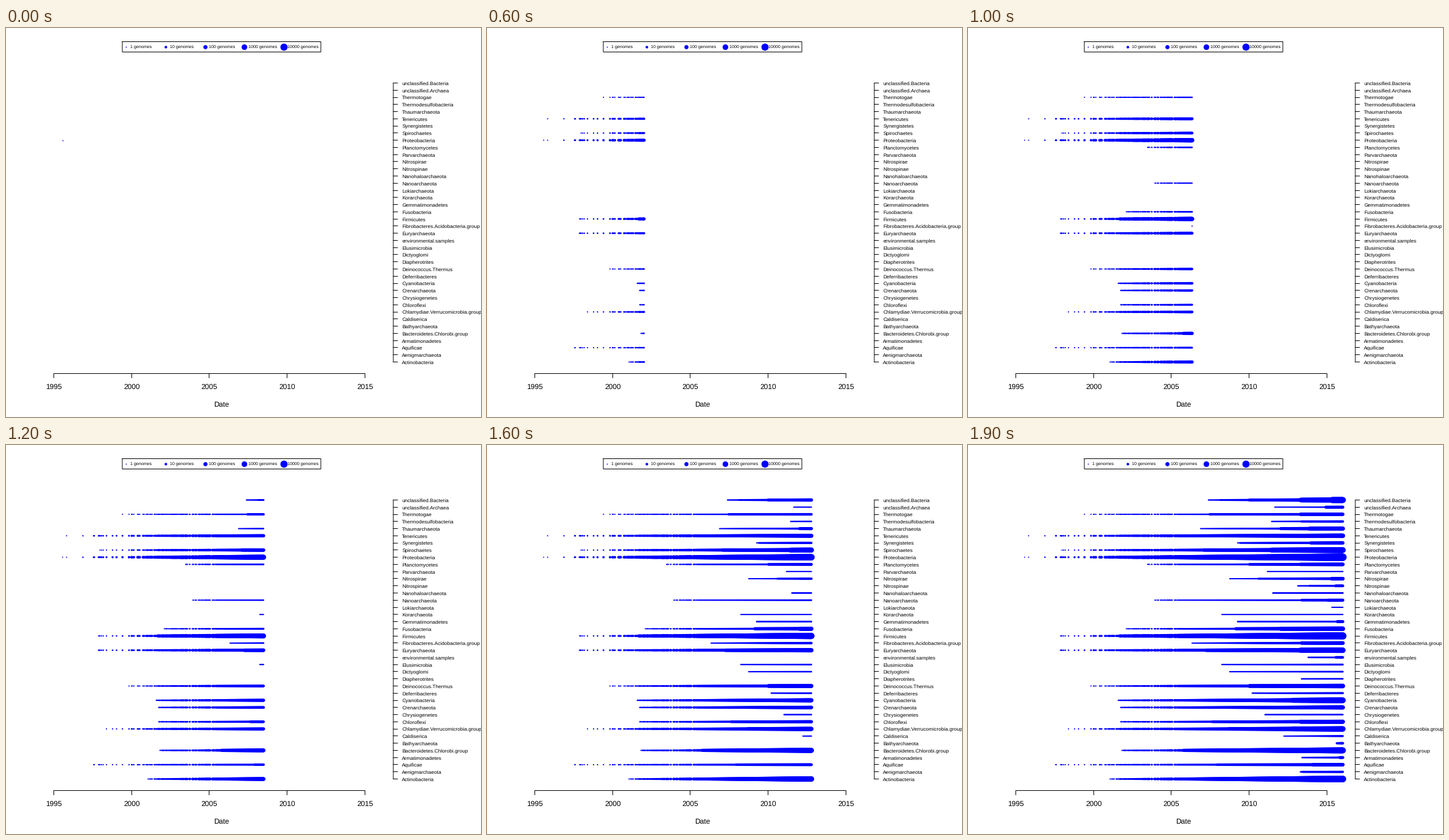
A matplotlib script for the animation above (3000 ms loop, 780 by 640 pixels).

```python
import numpy as np
import matplotlib
import matplotlib.pyplot as plt
from matplotlib.animation import FuncAnimation

matplotlib.rcParams["font.family"] = "Liberation Sans"
matplotlib.rcParams["text.hinting"] = "none"

W, H, DPI = 780, 640, 100
PX = 72 / DPI                      # points per pixel
BLUE = "#0000ff"
FRAMES, INTERVAL, LAST_STEP = 30, 100, 19
FIRST_X, STEP_X, END_X = 93, 27.5, 615.5
TOP_Y, ROW_H = 90.5, 459 / 39

# Top to bottom: name, x of first genome, dot diameter there, diameter at the end
GROUPS = [
    ("unclassified.Bacteria", 395, 2.2, 10),
    ("unclassified.Archaea", 503.5, 2, 5),
    ("Thermotogae", 191, 2, 5.5),
    ("Thermodesulfobacteria", 498, 2.3, 4),
    ("Thaumarchaeota", 382, 2, 7),
    ("Tenericutes", 99, 2, 7.5),
    ("Synergistetes", 442.5, 2, 5.5),
    ("Spirochaetes", 154, 2, 9.5),
    ("Proteobacteria", 93, 1.8, 12.5),
    ("Planctomycetes", 295, 2, 6),
    ("Parvarchaeota", 491.5, 2, 2.1),
    ("Nitrospirae", 429, 2, 6),
    ("Nitrospinae", 541, 2.3, 4.6),
    ("Nanohaloarchaeota", 500, 2.5, 2.8),
    ("Nanoarchaeota", 307, 2, 5),
    ("Lokiarchaeota", 597, 2, 2.1),
    ("Korarchaeota", 416, 2, 2.1),
    ("Gemmatimonadetes", 442.5, 2.5, 5),
    ("Fusobacteria", 260, 2, 7.5),
    ("Firmicutes", 152, 2, 12),
    ("Fibrobacteres.Acidobacteria.group", 368, 2, 6.3),
    ("Euryarchaeota", 152, 2.4, 9),
    ("environmental.samples", 558.5, 2.3, 4.2),
    ("Elusimicrobia", 416, 2.2, 3),
    ("Dictyoglomi", 429, 2.2, 2.8),
    ("Diapherotrites", 547.5, 2.3, 2.6),
    ("Deinococcus.Thermus", 202, 2, 7.5),
    ("Deferribacteres", 466, 2.3, 3.5),
    ("Cyanobacteria", 246, 2.4, 9.5),
    ("Crenarchaeota", 251, 2.4, 7),
    ("Chrysiogenetes", 487, 2.3, 2.6),
    ("Chloroflexi", 251, 2.2, 7),
    ("Chlamydiae.Verrucomicrobia.group", 165, 2, 9),
    ("Caldiserica", 518.5, 2, 3.3),
    ("Bathyarchaeota", 605, 3.5, 4.2),
    ("Bacteroidetes.Chlorobi.group", 253, 2.2, 10),
    ("Armatimonadetes", 548.5, 2.5, 4.8),
    ("Aquificae", 144, 2, 6),
    ("Aenigmarchaeota", 545.5, 2.2, 3.8),
    ("Actinobacteria", 233, 2.2, 11),
]

# Sudden gains in diameter: x -> gain
JUMPS = {
    "unclassified.Bacteria": {413: .6, 461: 1, 546: 2, 597: 1.5},
    "unclassified.Archaea": {587: 2.5},
    "Thermotogae": {396: 1.5, 545: 1},
    "Thermodesulfobacteria": {547: .7},
    "Thaumarchaeota": {513: 1.5, 560: .8},
    "Synergistetes": {446: .8, 562: 1},
    "Spirochaetes": {386: .5, 498: 1.4},
    "Planctomycetes": {461: 1, 545: .7},
    "Nitrospirae": {476: .7, 513: .5, 597: 1.3},
    "Nitrospinae": {560: .6, 603: 1.2},
    "Nanoarchaeota": {547: 1.4, 590: .6},
    "Gemmatimonadetes": {606: 1.8},
    "Fusobacteria": {439: 1.9, 513: 1},
    "Firmicutes": {249: 1},
    "Fibrobacteres.Acidobacteria.group": {547: 1.2},
    "Euryarchaeota": {390: .6, 545: 1},
    "environmental.samples": {603: 1},
    "Deinococcus.Thermus": {300: .4, 461: 1.3},
    "Cyanobacteria": {533: 1.2},
    "Chloroflexi": {400: .5, 545: .8},
    "Chlamydiae.Verrucomicrobia.group": {428: .6, 533: .8},
    "Bacteroidetes.Chlorobi.group": {353: 1.2},
    "Armatimonadetes": {610: 1.5},
    "Aquificae": {408: 1, 566: .9},
    "Aenigmarchaeota": {548: 1.2},
}

# Release dates as x positions: single ones first, then ever denser runs
SINGLES = [93, 99.5, 126.3, 144, 145, 152, 153.5, 154.5, 157, 159.7, 165, 175,
           181.5, 191.3, 202, 206, 207.5, 210, 216, 217.5, 219.5, 225, 227,
           230, 232, 233.5, 236, 238, 240, 243.5, 245, 247]
RUNS = [(249, 253), (255, 260), (262, 265), (267, 268), (270, 281), (283, 284),
        (286, 292), (294, 298), (301, 302.3), (306, 308), (310.5, 313),
        (316, 319), (321, 324), (326, 335.5), (339, 342), (344, END_X)]


def release_dates():
    runs = [np.linspace(a, b, int(round(b - a)) + 1) for a, b in RUNS]
    return np.concatenate([SINGLES] + runs)


def diameters(x, name, start, first, last):
    jumps = JUMPS.get(name, {})
    slope = (last - first - sum(jumps.values())) / (END_X - start)
    d = first + slope * (x - start)
    for at, gain in jumps.items():
        d = d + gain * (x >= at)
    return d


def row_y(i):
    return TOP_Y + i * ROW_H


def build_dots():
    dates = release_dates()
    parts = []
    for i, (name, start, first, last) in enumerate(GROUPS):
        x = dates[dates >= start - 0.1]
        d = diameters(x, name, start, first, last)
        parts.append(np.column_stack([x, np.full(x.size, row_y(i)), d]))
    return np.concatenate(parts)


fig = plt.figure(figsize=(W / DPI, H / DPI), dpi=DPI, facecolor="white")
ax = fig.add_axes([0, 0, 1, 1])
ax.set_xlim(0, W)
ax.set_ylim(H, 0)
ax.axis("off")


def line(xs, ys):
    ax.plot(xs, ys, color="black", lw=PX, snap=False,
            solid_capstyle="projecting", solid_joinstyle="miter")


def label(x, y, text, size, ha="left"):
    ax.text(x, y, text, fontsize=size * PX, ha=ha, va="baseline", color="black")


def sizes(d):
    return (np.asarray(d) * PX) ** 2


def draw_legend():
    line([191, 517, 517, 191, 191], [22.5, 22.5, 39.5, 39.5, 22.5])
    for k in range(5):
        x = 197.4 + 64.55 * k
        ax.scatter([x], [31], s=sizes([1.8 + 2.5 * k]), c=BLUE, linewidths=0)
        label(x + 6.6, 33.7, f"{10 ** k} genomes", 7.2)


def draw_axes():
    line([78.5, 589], [568.5, 568.5])
    for k in range(5):
        x = np.floor(78.5 + 127.65 * k) + 0.5
        line([x, x], [568.5, 575.5])
        label(x, 594.2, str(1995 + 5 * k), 12, "center")
    label(353.7, 623.2, "Date", 12, "center")

    line([636, 636], [TOP_Y, row_y(39)])
    for i, (name, *_) in enumerate(GROUPS):
        y = np.floor(row_y(i) + 0.01) + 0.5
        line([636, 643], [y, y])
        label(650.2, row_y(i) + 3.5, name, 8.4)


draw_legend()
draw_axes()
dots = build_dots()
cloud = ax.scatter([], [], c=BLUE, linewidths=0)


def update(i):
    cut = FIRST_X + STEP_X * min(i, LAST_STEP)
    seen = dots[dots[:, 0] <= cut + 0.1]
    cloud.set_offsets(seen[:, :2])
    cloud.set_sizes(sizes(seen[:, 2]), DPI)
    return (cloud,)


def reset():
    return update(0)


anim = FuncAnimation(fig, update, frames=FRAMES, init_func=reset,
                     interval=INTERVAL, repeat=True, repeat_delay=0, blit=False)
plt.show()
```
